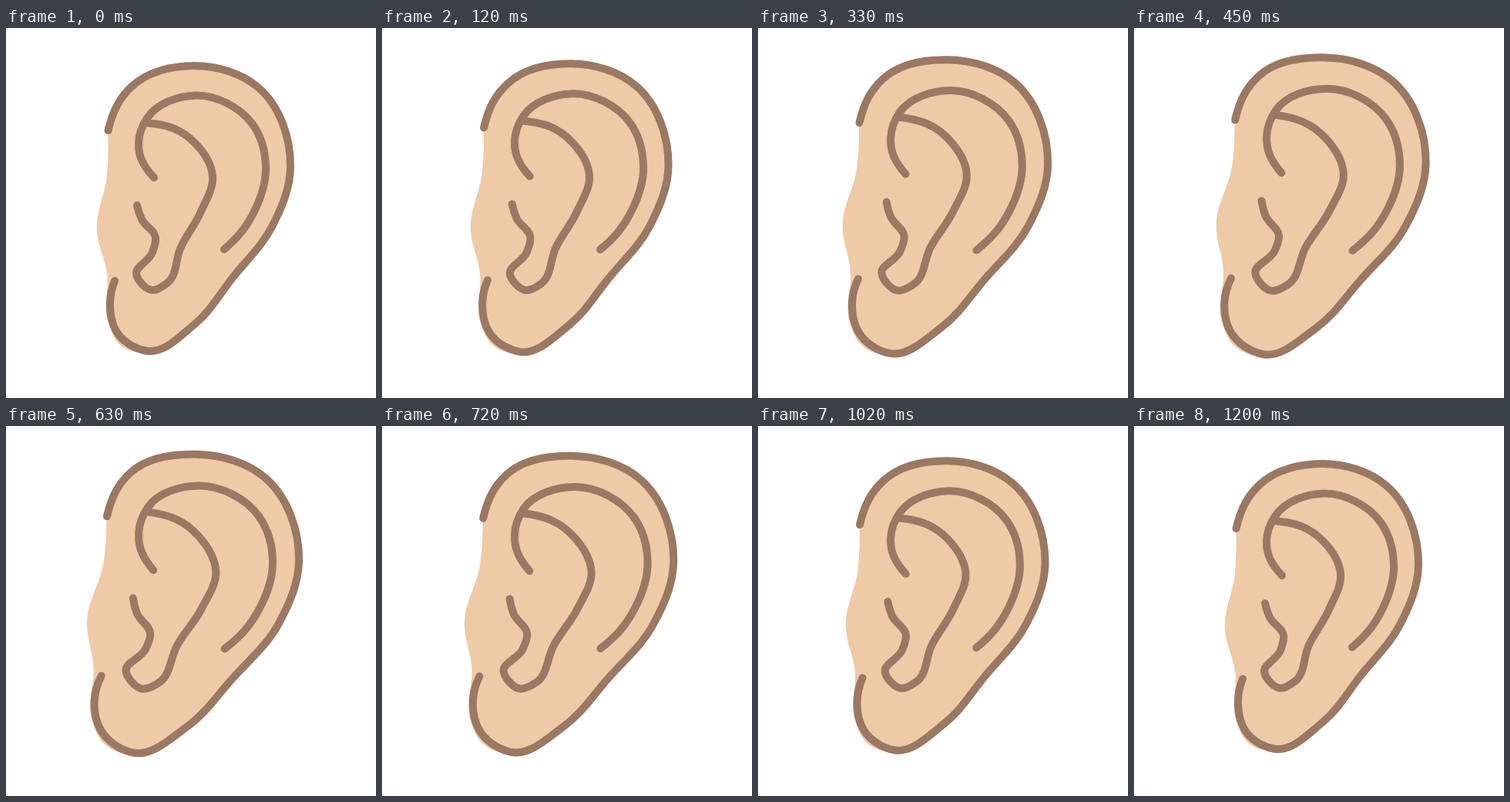
Recreate the animation shown at these times as an HTML page with a canvas. Size 480 by 480 pixels, loop 1.29 s.

```html
<!DOCTYPE html>
<html lang="en">
<head>
<meta charset="utf-8">
<title>Ear</title>
<style>
html, body { margin: 0; height: 100%; overflow: hidden; background: #fff; }
canvas { display: block; }
</style>
</head>
<body>
<canvas id="stage" width="480" height="480"></canvas>
<script>
const ctx = document.getElementById('stage').getContext('2d');
const SKIN = '#eecaa6', LINE = '#9a7863';
const LOOP = 1290, STEP = 30, PEAK = 570, END = 1200, REACH = 1.105;

// Key points of each curve at rest
const rim = [[132.5, 133], [163, 76], [244, 49], [327, 77], [369, 180], [346, 256],
  [294, 324], [245, 384], [183, 419], [147, 399], [135, 358], [141, 328]];
const cheek = [[132, 133], [131, 190], [118, 264], [131, 318], [133, 383], [148, 411], [183, 421]];
const fold = [[192, 194], [172, 150], [183, 117], [246, 87.5], [320, 125], [337, 180],
  [322, 238], [283, 287]];
const bowl = [[180, 123], [245, 149], [268, 192], [253, 238], [227, 284], [209, 331],
  [190, 340], [169, 319], [190, 291], [194, 272], [176, 248], [170, 230]];

// Pulls the ear wider towards the upper right and lower left
function stretch([x, y], k) {
  const u = (x - 250) / 120, v = (y - 234) / 185, middle = 1 - v * v;
  return [
    x + k * (-4.6 + 9.6 * u - 8.1 * v + middle * (5.5 + v * (8 * u - 3))),
    y + k * (-1.7 + 4.2 * u + 10.3 * v - 4.5 * u * u)
  ];
}

// Smooth curve through the key points, with handles scaled to the gaps between them
function trace(points, k) {
  const pts = points.map(p => stretch(p, k));
  const last = pts.length - 1;
  const gap = i => Math.hypot(pts[i + 1][0] - pts[i][0], pts[i + 1][1] - pts[i][1]);
  const chord = i => [0, 1].map(d => (pts[i + 1][d] - pts[i][d]) / gap(i));
  const mix = (a, wa, b, wb) => [0, 1].map(d => a[d] * wa + b[d] * wb);

  function slope(i) {
    if (i === 0) return mix(chord(0), 2, slope(1), -1);
    if (i === last) return mix(chord(last - 1), 2, slope(last - 1), -1);
    const before = gap(i - 1), after = gap(i), sum = before + after;
    return mix(chord(i - 1), after / sum, chord(i), before / sum);
  }

  ctx.beginPath();
  ctx.moveTo(...pts[0]);
  for (let i = 0; i < last; i++) {
    const reach = gap(i) * 0.36;
    ctx.bezierCurveTo(...mix(pts[i], 1, slope(i), reach),
      ...mix(pts[i + 1], 1, slope(i + 1), -reach), ...pts[i + 1]);
  }
}

function draw(now) {
  const t = Math.min(END, Math.floor(now % LOOP / STEP) * STEP);
  const k = REACH * (t < PEAK ? t / PEAK : (END - t) / (END - PEAK));
  ctx.fillStyle = '#fff';
  ctx.fillRect(0, 0, 480, 480);
  ctx.fillStyle = SKIN;
  for (const shape of [rim, cheek]) {
    trace(shape, k);
    ctx.fill();
  }
  ctx.strokeStyle = LINE;
  ctx.lineWidth = 10;
  ctx.lineCap = ctx.lineJoin = 'round';
  for (const line of [rim, fold, bowl]) {
    trace(line, k);
    ctx.stroke();
  }
}

const start = performance.now();
function tick() {
  draw(performance.now() - start);
  requestAnimationFrame(tick);
}
tick();
</script>
</body>
</html>
```
